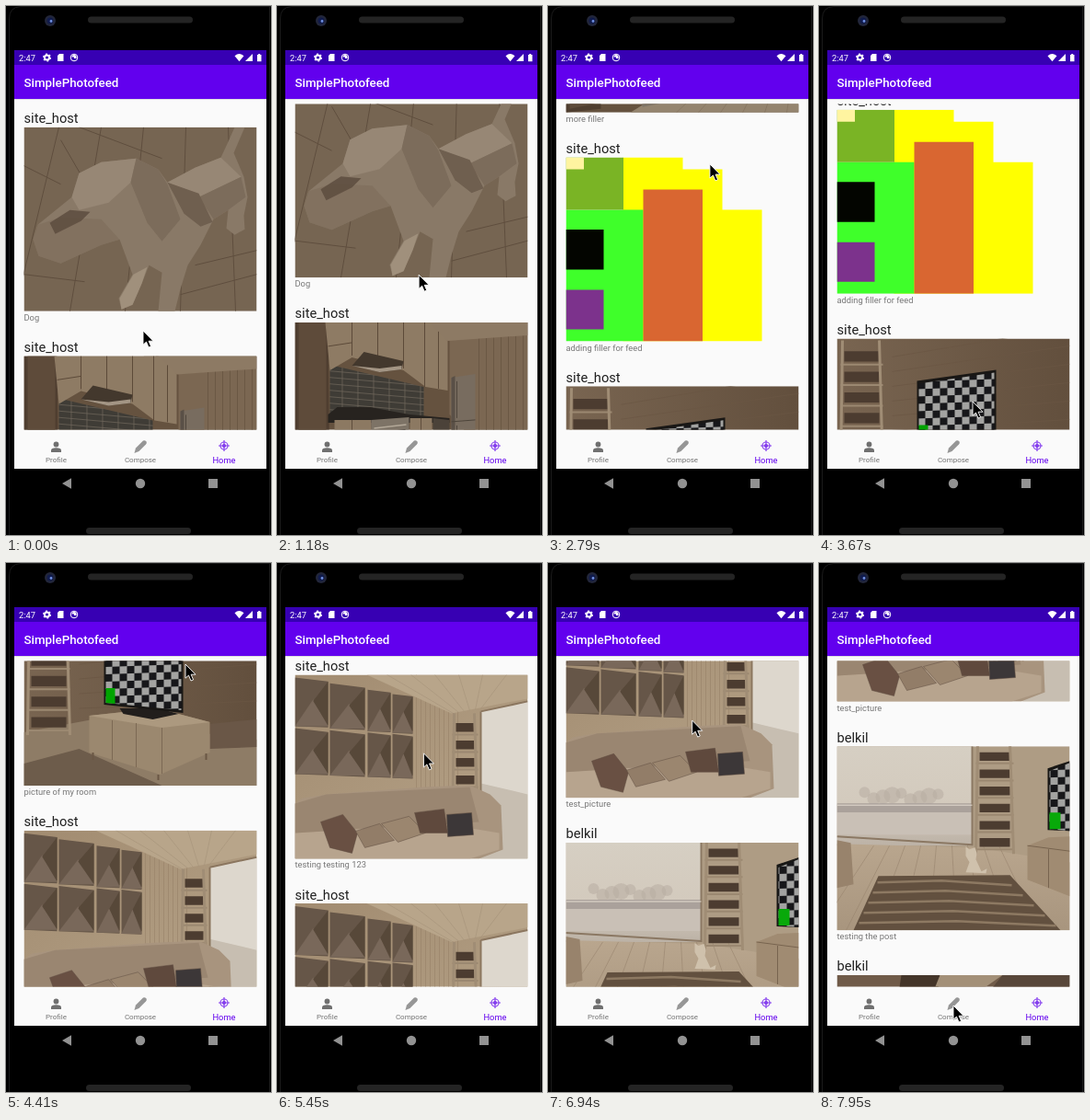
These frames come from a looping animation (288x575 px, 8 s). An HTML page:

```html
<!DOCTYPE html>
<html lang="en">
<head>
<meta charset="utf-8">
<title>Photo feed</title>
<style>
html, body { margin: 0; width: 100%; height: 100%; overflow: hidden; background: #000; }
svg { display: block; width: 288px; height: 575px; font-family: Roboto, sans-serif; }
.name { font-size: 14.67px; fill: #202020; }
.caption { font-size: 9.33px; fill: #777; }
.label { font-size: 8px; fill: #757575; text-anchor: middle; }
.label.on { font-size: 9.33px; fill: #6200ee; }
</style>
</head>
<body>
<svg viewBox="0 0 288 575">
  <defs>
    <clipPath id="list"><path d="M9 106.5H283V460.5H9Z"/></clipPath>
    <clipPath id="photo"><path d="M0 0H253V200H0Z"/></clipPath>
    <pattern id="checks" width="16" height="16" patternUnits="userSpaceOnUse" patternTransform="translate(88 47) skewY(-2)">
      <path d="M0 0H16V16H0Z" fill="#a3a3a1"/><path d="M0 0H8V8H16V16H8V8H0Z" fill="#17171a"/>
    </pattern>
    <pattern id="tiles" width="17" height="7" patternUnits="userSpaceOnUse" patternTransform="skewY(5)">
      <path d="M0 0H17V7H0Z" fill="#3f3c36"/><path d="M0 .5H17M.5 0V7" stroke="#6f675c" stroke-width=".7"/>
    </pattern>
    <linearGradient id="wood" x2="1" y2="1"><stop stop-color="#a18b70"/><stop offset="1" stop-color="#b7a489"/></linearGradient>
    <linearGradient id="den" x2="1"><stop stop-color="#796551"/><stop offset="1" stop-color="#624f3d"/></linearGradient>
    <linearGradient id="pane" x2="0" y2="1"><stop stop-color="#d6cfc3"/><stop offset=".6" stop-color="#d3cabd"/><stop offset="1" stop-color="#bcb2a6"/></linearGradient>
    <linearGradient id="planks" x2="0" y2="1"><stop stop-color="#b9a68e"/><stop offset="1" stop-color="#a8957e"/></linearGradient>
  </defs>

  <!-- phone body -->
  <path d="M0 0H288V575H0Z"/>
  <path d="M3.5 575V14Q3.5 1 16 .5H288M286.5 575V0" fill="none" stroke="#1b1b1b"/>
  <rect x="89" y="11.5" width="114" height="7" rx="3.5" fill="#242424"/>
  <rect x="87" y="567" width="114" height="7" rx="3.5" fill="#242424"/>
  <circle cx="48" cy="16" r="6" fill="#22263a"/>
  <circle cx="48" cy="16" r="3.4" fill="#101b4c"/>
  <circle cx="49" cy="16.5" r="1.4" fill="#6f8fe0"/>

  <!-- app -->
  <path d="M9 48H283V503H9Z" fill="#fafafa"/>
  <path d="M9 101H283V102H9Z" fill="#dedee0"/>
  <path d="M9 64H283V101H9Z" fill="#6200ee"/>
  <path d="M9 48H283V64H9Z" fill="#3700b3"/>
  <g fill="#fff">
    <text x="14" y="59.5" font-size="9.3">2:47</text>
    <text x="19.5" y="87.5" font-size="13.33" font-weight="500">SimplePhotofeed</text>
    <circle cx="44.5" cy="56" r="2.6" fill="none" stroke="#fff" stroke-width="2"/>
    <circle cx="44.5" cy="56" r="3.9" fill="none" stroke="#fff" stroke-width="1.2" stroke-dasharray="2 2.08"/>
    <path d="M58 52H62.5V60H56V54Z"/>
    <circle cx="74" cy="56" r="3.8" fill="none" stroke="#fff"/>
    <path d="M71.5 55.5A2.5 2.5 0 0 1 76.5 55.5V57H74V55.5Z"/>
    <path d="M248.5 54.2Q253.5 49.8 258.5 54.2L253.5 60.2Z"/>
    <path d="M268 52V60H260Z"/>
    <path d="M273 53H274.2V52H276.2V53H277.5V60.3H273Z"/>
  </g>
  <g clip-path="url(#list)"><g id="feed"></g></g>

  <!-- bottom navigation -->
  <g fill="#707070">
    <circle cx="54.5" cy="476.5" r="2.9"/>
    <path d="M49 485V483Q49 480.3 54.5 480.3T60 483V485Z"/>
    <path d="M139.5 486L141 480.5 149 472.5Q151 471.5 152.5 473.5 153.5 475 152 476.5L144.5 484Z" fill="#969696"/>
  </g>
  <g fill="none" stroke="#8640ee">
    <circle cx="237" cy="478" r="4" stroke-width="1.2"/>
    <path d="M237 472V484M231 478H243" stroke-width="1.2"/>
    <circle cx="237" cy="478" r="1.7" fill="#8640ee"/>
  </g>
  <text class="label" x="54.5" y="496.2">Profile</text>
  <text class="label" x="146" y="496.2">Compose</text>
  <text class="label on" x="237" y="496.5">Home</text>

  <!-- system navigation -->
  <g fill="#929292">
    <path d="M61 519L71 513.3V524.7Z"/>
    <circle cx="146" cy="519" r="5.2"/>
    <path d="M220 514H230V524H220Z"/>
  </g>
  <path id="cursor" d="M0 0V15.2L3.5 12.1 6 18 8.6 16.9 6.1 11.2H11Z" stroke="#fff" stroke-width=".9"/>
</svg>

<script>
const shape = (fill, d, extra = '') => `<path fill="${fill}" d="${d}" ${extra}/>`;
const line = (color, width, d) => `<path fill="none" stroke="${color}" stroke-width="${width}" d="${d}"/>`;
const box = (fill, x, y, w, h) => shape(fill, `M${x} ${y}h${w}v${h}h${-w}Z`);
const range = (n, draw) => Array.from({ length: n }, (_, i) => draw(i)).join('');

const dog = () =>
  box('#766552', 0, 0, 253, 200) +
  range(9, i => line('#5f4e3e', 1, `M${i * 46 - 100} 0L${i * 60 - 190} 200`)) +
  line('#5f4e3e', 1, 'M0 42L40 62M40 14L62 52M170 182L253 160M186 150L253 134M0 160L66 168M60 0L150 34') +
  shape('#897967', 'M10 122L15 106 52 76 60 50 84 38 122 34 146 46 156 60 186 44 214 33 221 18 229 0H240L228 28 239 54 243 76 239 96 240 111 229 117 220 110 222 90 206 100 192 128 178 150 170 176 164 200H146L150 158 136 150 128 170 118 193 106 198 103 186 118 160 104 122 84 128 40 148 16 140Z') +
  shape('#978775', 'M52 76L60 50 84 38 122 34 116 60 92 82 60 90ZM156 60L186 44 214 33 236 54 190 76Z') +
  shape('#7c6c5b', 'M122 34L146 46 156 62 170 100 150 124 134 104 116 60ZM190 76L236 54 241 76 222 90 206 100Z') +
  shape('#6f5f4f', 'M156 60L190 72 205 103 192 108 174 94Z') +
  shape('#7c6c5a', 'M10 122L15 106 40 98 84 100 104 122 84 128 40 148 16 140Z', 'opacity=".55"') +
  shape('#5b4a3c', 'M28 104L50 90 72 92 62 102 34 116Z', 'opacity=".8"') +
  shape('#a0907c', 'M104 186L119 160 134 152 128 170 118 193 106 198Z');

const kitchen = () =>
  box('#65523f', 0, 0, 253, 200) +
  shape('#7b6752', 'M143 0H253V138L196 130 168 100V20Z') +
  range(8, i => line('#6b5844', 1, `M${200 + i * 8} ${14 - i}V130`)) +
  shape('#8d7a64', 'M130 0H253V14L166 20Z') +
  shape('#94846f', 'M125 166L196 130 253 139V200H70Z') +
  range(6, i => line('#83725e', .7, `M${120 + i * 24} 200L${190 + i * 12} 134`)) +
  shape('#4f3e30', 'M0 0H36L38 196 0 200Z') +
  shape('#5e4b3a', 'M4 0H34V190L4 196Z') +
  shape('url(#tiles)', 'M38 46L140 70V106H38Z') +
  shape('#8e7b64', 'M33 0H146L166 20V74L142 70 118 52 62 38 38 52Z') +
  line('#5c4a39', 1, 'M62 0V36M90 0V40M118 0V50M141 0V70M156 10V72M36 26L62 22') +
  shape('#43382d', 'M62 47L75 32 118 42 116 51 92 54Z') +
  shape('#a39584', 'M62 47L92 54 116 51V47L92 50Z') +
  shape('#27231f', 'M36 100L46 92 82 92 124 100 168 104V109H36Z') +
  shape('#8c7962', 'M43 106H83V186L43 178Z') +
  line('#5f4d3c', 1, 'M43 122H83M43 138H83M43 154H83M43 170L83 172M62 106V182') +
  shape('#7d7366', 'M83 106L124 103V186L83 194Z') +
  shape('#2e2925', 'M87 120L120 116V146L87 152Z') +
  line('#b3a898', 1.5, 'M86 115L121 111M86 180L121 172') +
  shape('#8c7962', 'M125 104H149V166L125 176Z') + line('#5f4d3c', 1, 'M137 104V170') +
  shape('#4b4239', 'M150 104L168 106V160L150 166Z') +
  shape('#786c5f', 'M170 60L196 56V152L170 161Z') +
  shape('#5a5047', 'M170 60L174 58V161L170 161Z') +
  line('#4d443a', 1, 'M170 108L196 106M176 64V104M176 112V140');

const blocks = () =>
  shape('#ff0', 'M62 0H127V13H170V57H213V200H62Z') +
  box('#3fff2a', 0, 57, 84, 143) +
  box('#7ab425', 0, 0, 62.5, 57) +
  box('#fff4a0', 0, 0, 19.5, 13) +
  box('#d96631', 84, 35, 64.5, 165) +
  box('#030500', 0, 78.5, 41, 43.5) +
  box('#7c328c', 0, 144, 41, 43);

const shelf = (x, y, w, h, rows) => {
  const gap = h / rows;
  return range(rows, i => box('#4c3c30', x + 4, y + i * gap + gap * .35, w - 8, gap * .5) +
    line('#9b8871', 2, `M${x} ${y + (i + 1) * gap}h${w}`)) +
    line('#a08d75', 3, `M${x + 2} ${y - 4}L${x} ${y + h + 5}M${x + w - 4} ${y - 4}L${x + w} ${y + h + 5}`);
};

const tvRoom = () =>
  box('url(#den)', 0, 0, 253, 200) +
  range(7, i => line('#6a5644', .7, `M60 ${20 + i * 16}L253 ${i * 20 - 12}`)) +
  shape('#8e7c66', 'M0 142L75 128 253 150V200H0Z') +
  shape('#6a5747', 'M202 133L253 128V158L202 160Z') +
  shape('#6d5c4b', 'M0 176L60 160 150 200H0Z') +
  shelf(4, 6, 46, 134, 6) +
  shape('#9b886f', 'M71 124L145 116 202 131V164L148 188 71 164Z') +
  shape('#ac997f', 'M71 124L145 116 202 131 150 137Z') +
  line('#7c6954', 1, 'M150 137V187M96 129V172M122 132V180') +
  line('#6a5745', 2, 'M75 164V172M146 188V194M198 165V172') +
  shape('#221e1c', 'M104 116H146L168 122 140 128 108 122Z') +
  shape('#191715', 'M87 46L173 34V121L87 112Z') +
  shape('url(#checks)', 'M89 49L171 37V118L89 110Z') +
  shape('#00a400', 'M89 94H99V111L89 110Z');

const cushion = (fill, d) => shape(fill, d, 'stroke="#5f4d40" stroke-width=".5"');

const sofaRoom = () =>
  box('url(#wood)', 0, 0, 253, 200) +
  range(10, i => line('#978269', .6, `M${132 + i * 5} ${i * 4}V130`)) +
  shape('#b8a58a', 'M78 0H253V26L170 42Z') +
  range(6, i => line('#a5927a', .6, `M${100 + i * 26} 0L${172 + i * 6} ${42 - i}`)) +
  shape('#ddd7cd', 'M202 40L253 29V200H202Z') +
  shape('#c7beb1', 'M202 118L253 130V200H202Z') +
  line('#8b765f', 2, 'M202 40V170M202 40L253 29') +
  shelf(171, 46, 28, 114, 6) +
  range(8, i => {
    const x = [0, 38, 79, 106][i % 4], w = [36, 38, 25, 22][i % 4];
    const low = i > 3, y = low ? 58 + x * .06 : 3 + x * .17, h = low ? 50 - x * .02 : 53 - x * .1;
    return shape('#665648', `M${x} ${y}l${w} ${w * .12}v${h - w * .08}l${-w} ${-w * .04}Z`) +
      shape('#79685a', `M${x} ${y + h}l${w * .55} ${-h * .55} ${w * .45} ${h * .55}Z`) +
      shape('#574839', `M${x + w} ${y + w * .12}l${-w * .45} ${h * .4} ${w * .45} ${h * .5}Z`);
  }) +
  shape('#a8947e', 'M0 140L8 134 34 130 140 122 190 120 212 130 224 142 226 190 200 200H0Z') +
  shape('#b7a48e', 'M0 172L60 168 150 160 222 172V190L190 200H0Z') +
  shape('#927e69', 'M0 140L34 130 190 122 200 160 0 172Z', 'opacity=".6"') +
  cushion('#695043', 'M28 160L52 152 68 172 62 194 38 188Z') +
  cushion('#927d68', 'M66 170L92 162 108 180 76 188Z') +
  cushion('#9b866f', 'M94 162L124 154 142 172 112 182Z') +
  cushion('#5f493d', 'M130 150L162 146 166 172 136 172Z') +
  cushion('#3c3738', 'M165 152L192 150 194 174 166 176Z');

const windowRoom = () =>
  box('#ae9c84', 0, 0, 253, 200) +
  shape('url(#pane)', 'M0 0H147V108H0Z') +
  range(9, i => `<circle cx="${30 + i * 10}" cy="${50 + i * 7 % 9}" r="${6 + i * 5 % 4}" fill="#b9aea2" opacity=".55"/>`) +
  box('#aaa19b', 0, 62, 147, 10) + box('#c9c0b6', 0, 72, 147, 24) +
  line('#8b7863', 2, 'M147 0V108M0 98L147 107') + line('#e5ddd1', 1, 'M0 64H147') +
  shape('url(#planks)', 'M0 106L150 110 253 126V200H0Z') +
  range(9, i => line('#97846d', .6, `M${i * 30 - 20} 200L${40 + i * 17} 108`)) +
  shelf(151, 0, 41, 112, 6) +
  shape('#98836c', 'M0 102L15 105 18 150 0 154Z') +
  shape('#62503f', 'M45 141L188 140 243 200H18Z') +
  range(5, i => line('#8d7962', 2.5, `M${44 - i * 5} ${148 + i * 11}l${70 + i * 9} -2l${76 + i * 8} 5`)) +
  shape('#cfc1ac', 'M140 137L144 126 140 119V109L144 112 150 110 152 116 151 123 157 136 163 133 162 138Z') +
  shape('#181715', 'M229 24L253 16V92L229 91Z') +
  shape('url(#checks)', 'M231 27L253 18V92L231 90Z') +
  box('#08a90a', 231, 72, 12, 18) +
  shape('#a08b72', 'M207 108L230 99 253 98V163L207 145Z') +
  line('#78644f', 1, 'M207 108L253 114M230 112V154');

const hallway = () =>
  box('#705b49', 0, 0, 253, 200) +
  shape('#443529', 'M70 0H112L84 200H40Z') +
  shape('#a39078', 'M112 0H180L160 14 104 20Z') +
  shape('#58473a', 'M180 0H253V20H164Z');

const posts = [
  ['site_host', 'Dog', dog],
  ['site_host', 'more filler', kitchen],
  ['site_host', 'adding filler for feed', blocks],
  ['site_host', 'picture of my room', tvRoom],
  ['site_host', 'testing testing 123', sofaRoom],
  ['site_host', 'test_picture', sofaRoom],
  ['belkil', 'testing the post', windowRoom],
  ['belkil', '', hallway],
];
const PITCH = 248.7;
const feed = document.getElementById('feed');
const cursor = document.getElementById('cursor');

feed.innerHTML = posts.map(([name, caption, draw], i) => `
  <g transform="translate(19.5 ${131.7 + i * PITCH})">
    <text class="name" y="-4.5">${name}</text>
    <g clip-path="url(#photo)">${draw()}</g>
    <text class="caption" y="210">${caption}</text>
  </g>`).join('');

// time, pointer x, pointer y, scroll
const keys = [
  [0, 149, 353, 0], [985, 153, 328, 0], [1735, 160, 106, 226], [1950, 163, 200, 242.7],
  [2340, 167, 394, 242.7], [2360, 167, 394, 242.7], [2960, 178, 120, 516.4], [3100, 178, 120, 516.4],
  [3660, 167, 430, 516.4], [3680, 167, 430, 516.4], [4400, 195, 110, 835.8], [4560, 195, 110, 835.8],
  [5050, 152, 376, 835.8], [5760, 165, 80, 1132], [5900, 165, 80, 1132],
  [6440, 150, 359, 1132], [6480, 150, 359, 1132], [7180, 160, 77, 1414],
  [7340, 160, 76, 1424.7], [7930, 146, 481, 1424.7], [8000, 146, 481, 1424.7],
];
const LOOP = 8000, STEP = 147;

function pose(t) {
  const i = keys.findIndex(key => key[0] > t);
  const a = keys[i - 1], b = keys[i];
  const u = (t - a[0]) / (b[0] - a[0]);
  const eased = u * u * (3 - 2 * u);
  return a.map((v, k) => v + (b[k] - v) * eased);
}

const start = performance.now();
function render(now) {
  const t = Math.max(0, now - start) % LOOP;
  const [, x, y, scroll] = pose(Math.floor((t + 8) / STEP) * STEP);
  feed.setAttribute('transform', `translate(0 ${-scroll})`);
  cursor.setAttribute('transform', `translate(${x} ${y})`);
  requestAnimationFrame(render);
}
render(start);
</script>
</body>
</html>
```
